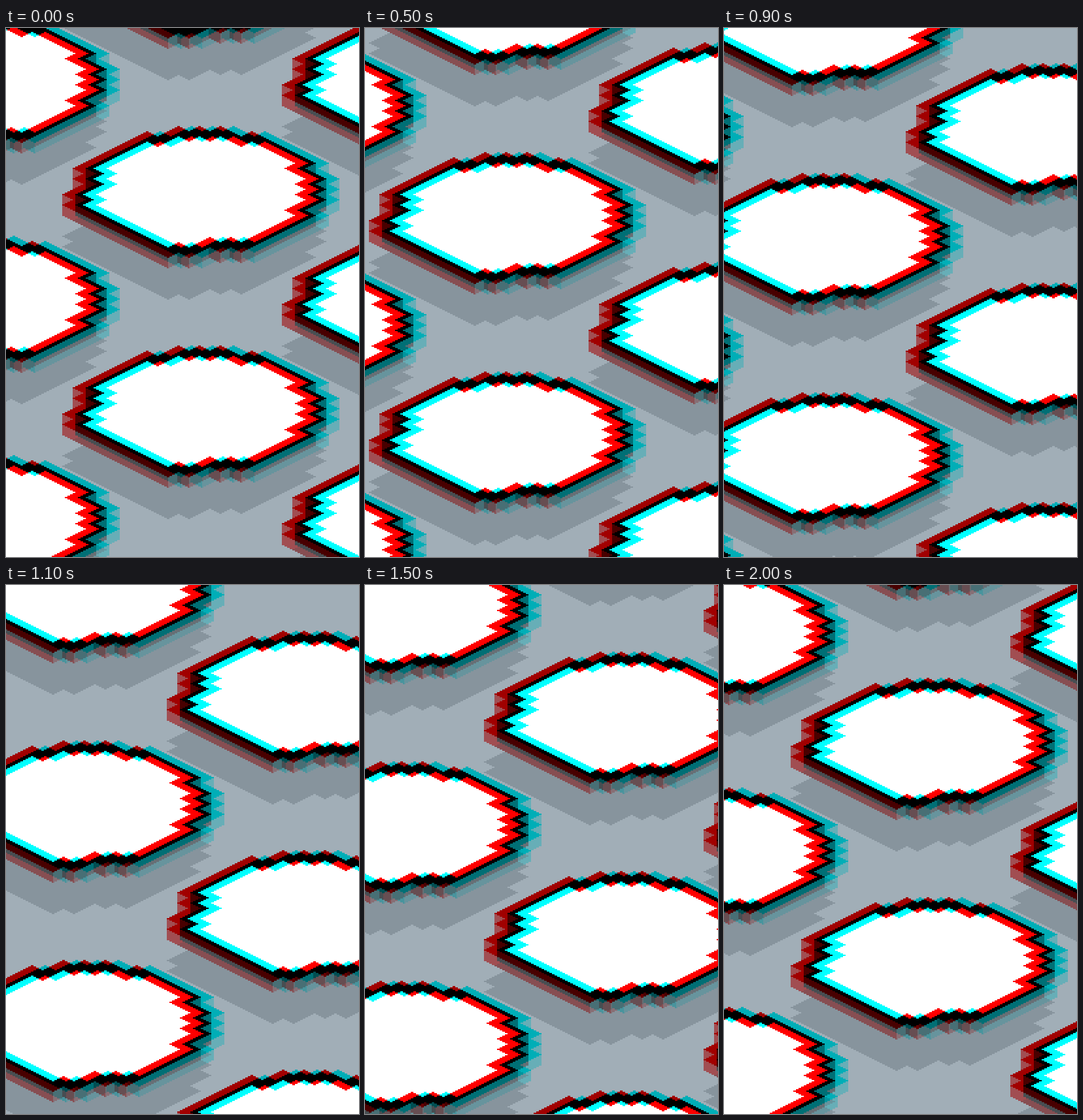
Animation, 540 px wide and 810 px high, one loop 2.1 s. Source, as an HTML page with a canvas:

```html
<!DOCTYPE html>
<html>
<head>
<meta charset="utf-8">
<style>
html, body { margin: 0; width: 100%; height: 100%; overflow: hidden; background: #a1aeb7; }
canvas { display: block; }
</style>
</head>
<body>
<canvas id="stage" width="540" height="810"></canvas>
<script>
const W = 540, H = 810, N = 16;
const GROUND = '#a1aeb7', SHADE = '#87949d', RIM = '#000', FILL = '#fff';
const LEFT_WALL = '#484e52', RIGHT_WALL = '#676f75';
const INSET = [5, 3, 2, 1, 1, 0, 0, 0, 0, 0, 0, 0, 1, 2, 2, 3];
const DEPTH = 16, DROP = 64, SHIFT = 20, SPAN = 336;
const STEP_MS = 100, STEPS = 21;
const CX = 220;   // x of the tile origin inside its own canvas

function makeCanvas(w, h) {
  const c = document.createElement('canvas');
  c.width = w;
  c.height = h;
  return c.getContext('2d');
}

const inside = (i, j) =>
  j >= 0 && j < N && i >= INSET[j] && i < N - INSET[j];

const inner = (i, j) =>
  [-1, 0, 1].every(a => [-1, 0, 1].every(b => inside(i + a, j + b)));

// Cells from back to front
const cells = [];
for (let s = 0; s < 2 * N; s++)
  for (let i = 0; i <= s; i++)
    if (inside(i, s - i)) cells.push([i, s - i]);

// One isometric cell built from two-pixel rows
function diamond(g, i, j, left, right = left, dy = 0) {
  const x = CX + 16 * (i - j), top = 8 * (i + j) - 2 + dy;
  for (let k = 0; k < 9; k++) {
    const y = top + 2 * k, r = 18 - 4 * Math.abs(k - 4);
    g.fillStyle = left;
    g.fillRect(x - r, y, r, 2);
    g.fillStyle = right;
    g.fillRect(x, y, r, 2);
  }
}

const block = makeCanvas(440, 270), shadow = makeCanvas(440, 270);
for (const [i, j] of cells) {
  diamond(shadow, i, j, SHADE);
  for (let dy = 2; dy <= DEPTH; dy += 2)
    diamond(block, i, j, LEFT_WALL, RIGHT_WALL, dy);
}
for (const [i, j] of cells) diamond(block, i, j, RIM);
for (const [i, j] of cells) if (inner(i, j)) diamond(block, i, j, FILL);

const out = document.getElementById('stage').getContext('2d');
const buf = makeCanvas(W, H);

function tile(sprite, x, y) {
  for (let a = -2; a <= 3; a++)
    for (let b = -3; b <= 5; b++)
      buf.drawImage(sprite.canvas, x - CX + a * SPAN, y + b * SPAN - a * SPAN / 2);
}

// Draws the scene for some colour channels and adds it to the stage
function pass(x, y, shift, tint) {
  buf.globalCompositeOperation = 'source-over';
  buf.fillStyle = GROUND;
  buf.fillRect(0, 0, W, H);
  tile(shadow, x, y + DROP);
  tile(block, x + shift, y);
  buf.globalCompositeOperation = 'multiply';
  buf.fillStyle = tint;
  buf.fillRect(0, 0, W, H);
  out.drawImage(buf.canvas, 0, 0);
}

function draw(n) {
  const x = 296 - 16 * n, y = 120 + 8 * n;
  out.globalCompositeOperation = 'source-over';
  out.fillStyle = '#000';
  out.fillRect(0, 0, W, H);
  out.globalCompositeOperation = 'lighter';
  pass(x, y, SHIFT, '#f00');
  pass(x, y, 0, '#0ff');
}

let last = -1;
const start = performance.now();
function frame() {
  const n = Math.floor((performance.now() - start) / STEP_MS) % STEPS;
  if (n !== last) draw(last = n);
  requestAnimationFrame(frame);
}
frame();
</script>
</body>
</html>
```
